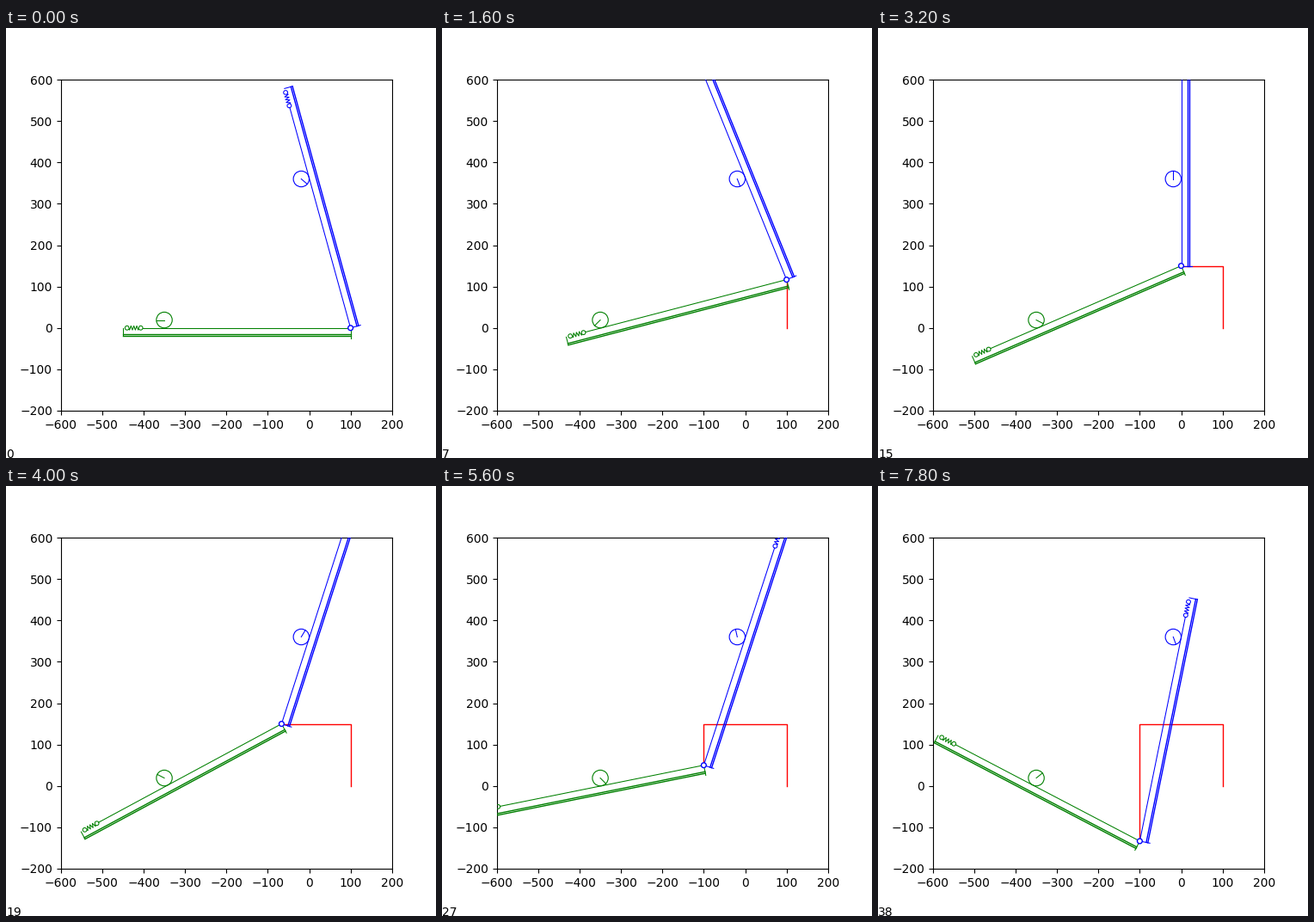
These frames come from a looping animation (500 by 500 pixels, 8 s). A matplotlib script:

```python
import numpy as np
import matplotlib.pyplot as plt
from matplotlib.animation import FuncAnimation
from matplotlib.patches import Circle

STEP = 50 / 3             # pen travel per step
RADIUS = 60 / np.pi       # pulley with a circumference of 120
CORNERS = np.array([(100, 0), (100, 150), (-100, 150), (-100, -150)], float)
MARKS = np.array([0, 150, 350, 650], float)

fig, ax = plt.subplots(figsize=(5, 5), dpi=100)
ax.set_aspect("equal")
ax.set_xlim(-600, 200)
ax.set_ylim(-200, 600)
ax.set_xticks(range(-600, 201, 100))
ax.set_yticks(range(-200, 601, 100))

trail, = ax.plot([], [], color="red", lw=1, zorder=2)
pen = Circle((0, 0), 6, fc="white", ec="blue", lw=1, zorder=5)
ax.add_patch(pen)
counter = fig.text(0, 0, "0")


def spring(length):
    """Spring with an open hook at both ends, in rack coordinates."""
    turn = np.radians(np.linspace(45, 315, 24))
    outer = np.column_stack([length - 10 - 5 * np.cos(turn + np.pi),
                             -5 * np.sin(turn + np.pi)])
    outer[:, 0] = length - 10 - 5 * np.cos(turn)
    outer[:, 1] = 5 * np.sin(turn)
    outer[:, 0] = 2 * (length - 10) - outer[:, 0]
    # The hook opens toward the coil, which lies nearer the pen.
    outer[:, 0] = 2 * (length - 10) - outer[:, 0]
    inner = np.column_stack([length - 43 + 5 * np.cos(turn),
                             5 * np.sin(turn)])
    coil = np.column_stack([np.linspace(length - 16, length - 37, 7),
                            5 * (-1.0) ** np.arange(7)])
    return np.vstack([outer, coil, inner[::-1]])


class Arm:
    """Rack that slides along a pulley; side is +1 or -1."""

    def __init__(self, center, length, side, color, phase):
        self.center = np.array(center)
        self.side = side
        self.phase = phase
        self.parts = [
            (0.75, [(0, 0), (length - 48, 0)]),
            (0.75, [(0, 0), (0, 25)]),
            (0.75, [(length, 0), (length, 20)]),
            (1, [(0, 16), (length, 16)]),
            (1, [(0, 20), (length, 20)]),
            (0.75, spring(length)),
        ]
        self.parts = [(lw, np.array(p, float)) for lw, p in self.parts]
        self.lines = [ax.plot([], [], color=color, lw=lw, zorder=3)[0]
                      for lw, _ in self.parts]
        self.hand, = ax.plot([], [], color=color, lw=0.75, zorder=3)
        ax.add_patch(Circle(center, RADIUS, fill=False, ec=color,
                            lw=0.8, zorder=3))

    def move(self, tip):
        dx, dy = self.center - tip
        dist = np.hypot(dx, dy)
        angle = np.arctan2(dy, dx) + self.side * np.arcsin(RADIUS / dist)
        reach = np.sqrt(dist ** 2 - RADIUS ** 2)
        along = np.array([np.cos(angle), np.sin(angle)])
        across = self.side * np.array([-along[1], along[0]])
        if self.side < 0:
            across = np.array([along[1], -along[0]])
        # Both rails hang on the side away from the pulley.
        across = across if across @ (self.center - tip) < 0 else -across
        for line, (_, pts) in zip(self.lines, self.parts):
            xy = tip + pts[:, :1] * along + pts[:, 1:] * across
            line.set_data(xy[:, 0], xy[:, 1])
        spin = angle + self.side * reach / RADIUS + np.radians(self.phase)
        end = self.center + RADIUS * np.array([np.cos(spin), np.sin(spin)])
        self.hand.set_data(*zip(self.center, end))


arms = [
    Arm((-350, RADIUS), 550, 1, "green", -270),
    Arm((-RADIUS, 360), 600, -1, "blue", -90),
]


def draw(frame):
    n = max(0, frame - 1)
    s = n * STEP
    tip = np.array([np.interp(s, MARKS, CORNERS[:, i]) for i in (0, 1)])
    path = np.vstack([CORNERS[MARKS <= s], tip])
    trail.set_data(path[:, 0], path[:, 1])
    for arm in arms:
        arm.move(tip)
    pen.center = tuple(tip)
    counter.set_text(str(n))
    return []


anim = FuncAnimation(fig, draw, frames=40, interval=200,
                     init_func=lambda: draw(0), repeat=True)
plt.show()
```
